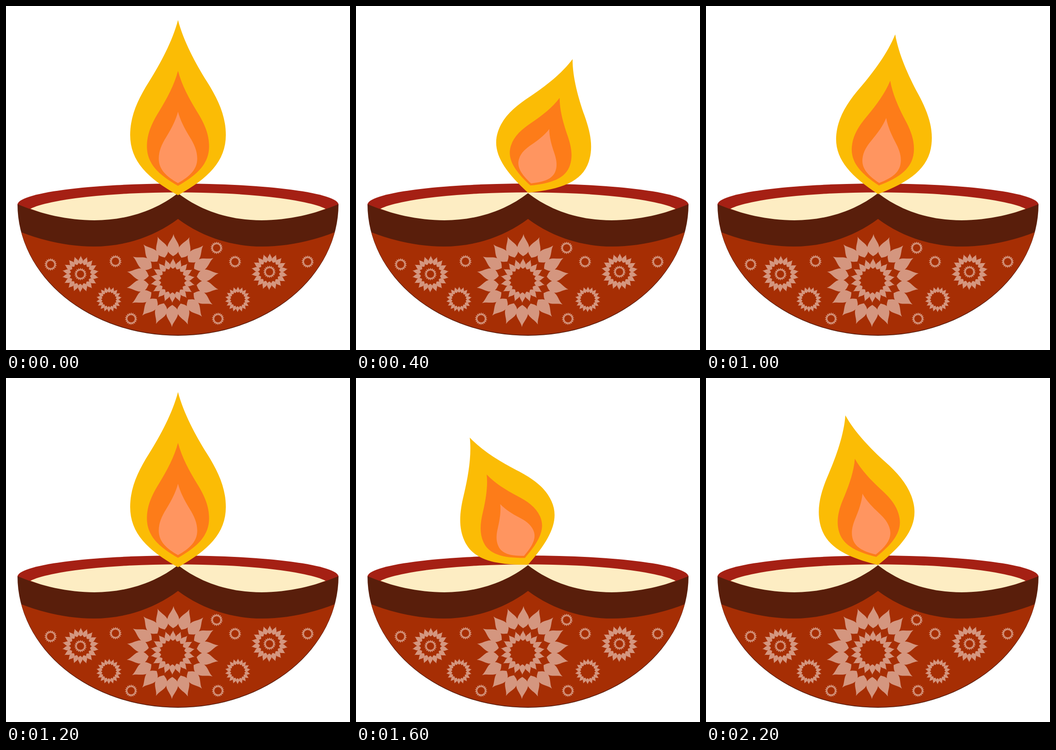
An HTML page for the animation above (2.4 s loop, 748 by 748 pixels).

```html
<!DOCTYPE html>
<html lang="en">
<head>
<meta charset="utf-8">
<title>Oil lamp</title>
<style>
  html, body { margin: 0; width: 100%; height: 100%; overflow: hidden; background: #fff; }
  svg { display: block; width: 100vw; height: 100vh; }
</style>
</head>
<body>
<svg viewBox="0 0 748 748">
  <defs>
    <!-- base of the drop at the origin -->
    <path id="drop" d="M0-381C12-335 38-287 63-247C87-209 104-173 104-131C104-74 66-37 0 0
      C-66-37-104-74-104-131C-104-173-87-209-63-247C-38-287-12-335 0-381Z"/>
    <path id="petal" d="M0-101C-2-90-13-82-13-70C-13-61-6-57 0-53C6-57 13-61 13-70C13-82 2-90 0-101Z"/>
    <g id="ring"></g>
  </defs>
  <ellipse cx="374" cy="432" rx="349" ry="46" fill="#a52014"/>
  <path fill="#fdedc3" d="M53 441A335 50 0 0 1 695 441L556 490H192Z"/>
  <path fill="#591e0b" d="M25 431C75 452 135 466 192 466C262 466 325 445 374 407
    C423 445 486 466 556 466C613 466 673 452 723 431A349 286 0 0 1 25 431Z"/>
  <path fill="#a62e04" d="M33.500 492C85 512 140 523 190 523C258 523 322 502 374 463
    C426 502 490 523 558 523C608 523 663 512 714.500 492A349 286 0 0 1 33.500 492Z"/>
  <g id="flowers" fill="#d4967f"></g>
  <g id="flame">
    <use href="#drop" fill="#fbbc05"/>
    <use href="#drop" fill="#fd7c19" transform="translate(0 -20.500) scale(.65 .656)"/>
    <use href="#drop" fill="#ff9560" transform="translate(0 -26.500) scale(.402 .407)"/>
  </g>
</svg>
<script>
const byId = id => document.getElementById(id);

function addUse(parent, ref, transform) {
  const el = document.createElementNS("http://www.w3.org/2000/svg", "use");
  el.setAttribute("href", ref);
  el.setAttribute("transform", transform);
  parent.append(el);
}

// Each flower is one or two rings of petals around a centre
function addFlowers(radii, ...centres) {
  for (const [x, y] of centres)
    for (const r of radii) addUse(byId("flowers"), "#ring", `translate(${x} ${y}) scale(${r / 101})`);
}

const PETALS = 18;
for (let i = 0; i < PETALS; i++) addUse(byId("ring"), "#petal", `rotate(${1 + i * 360 / PETALS})`);

addFlowers([101, 48.5], [362.5, 597]);
addFlowers([40, 14], [162, 583], [573, 578]);
addFlowers([28], [224, 638], [504, 638]);
addFlowers([14], [97, 562], [238, 555], [272, 680], [458, 526], [461, 680], [498, 556], [656, 556]);

const STEP = 200, STEPS = 12, TILT = 6.15;
const stretchByLean = [1, .917, .874, .804, .798, .83];

function render(ms) {
  const phase = Math.floor(ms / STEP) / STEPS * 2 * Math.PI;
  // Triangle wave 0..3..0..-3..0, one whole number per step
  const swing = Math.round(Math.asin(Math.sin(phase)) * 6 / Math.PI);
  const side = Math.sign(swing), reach = Math.abs(swing);
  // The flame leans one notch less to the right than to the left
  const lean = Math.min(2 * reach, reach + 2) - (side > 0 ? 1 : 0);
  const base = 406 + Math.max(0, 5.5 - 2.5 * lean);
  byId("flame").setAttribute("transform",
    `translate(374 ${base}) rotate(${side * lean * TILT}) scale(1 ${stretchByLean[lean]})`);
}

const start = performance.now();
function tick() {
  render(performance.now() - start);
  requestAnimationFrame(tick);
}
tick();
</script>
</body>
</html>
```
